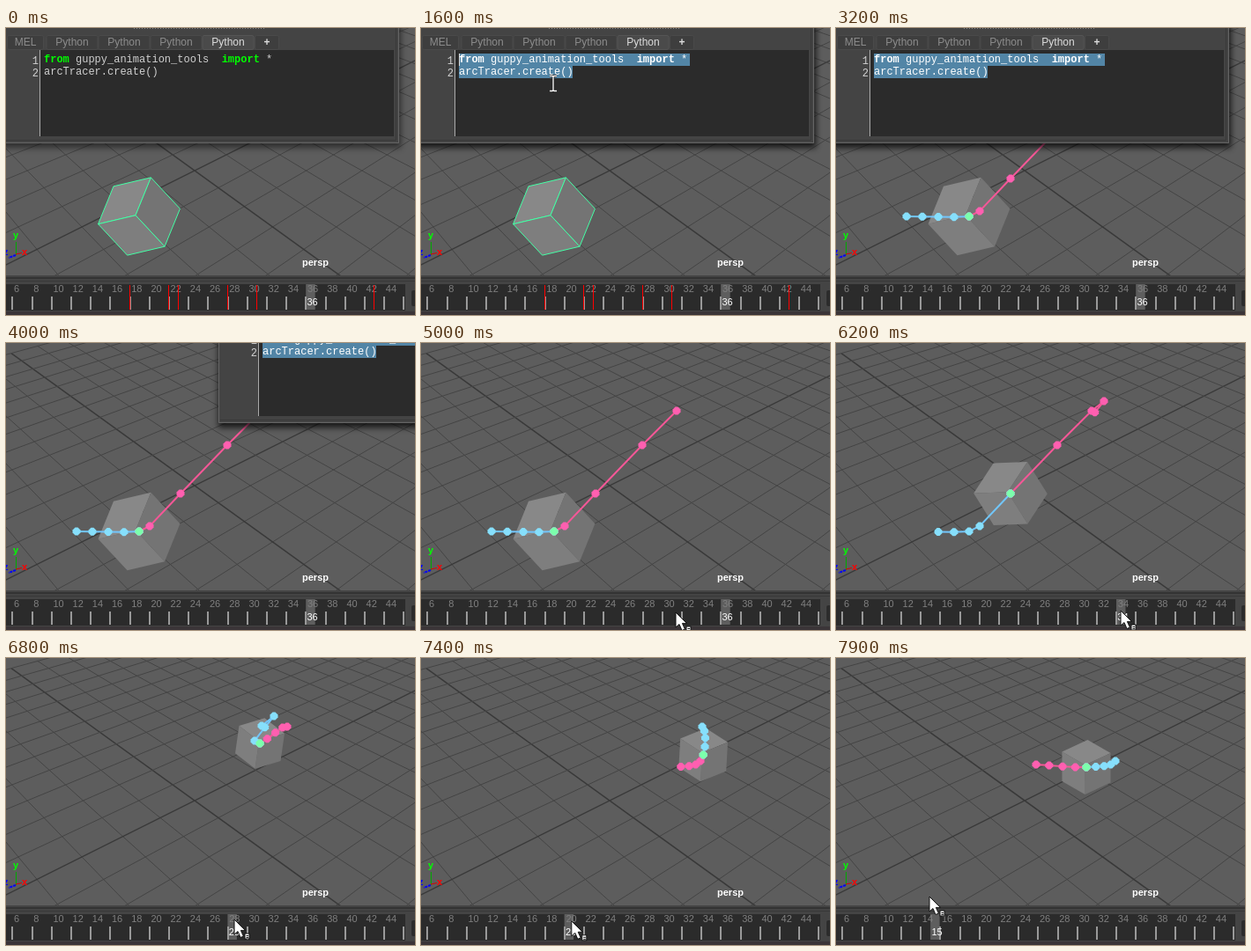
Write an HTML page that moves like this. It is 464 by 326 pixels and loops after 8000 ms.

```html
<!DOCTYPE html>
<html lang="en">
<head>
<meta charset="utf-8">
<title>Arc tracer</title>
<style>
html, body { margin: 0; width: 464px; height: 326px; overflow: hidden; background: #5d5d5d; }
svg { display: block; font: 11px "Liberation Sans", Arial, sans-serif; }
text { white-space: pre; }
.grid { stroke: #444; stroke-width: 1; fill: none; }
.axis { stroke: #393939; stroke-width: 1.5; fill: none; }
.bold { font-weight: bold; }
.mid { text-anchor: middle; }
.code { font: 12px "Liberation Mono", "DejaVu Sans Mono", monospace; fill: #d0d0d0; }
.kw { font-weight: bold; fill: #0f0; }
.selected .code, .selected .kw { fill: #fff; }
.tab { font-size: 12px; fill: #8c8c8c; }
.tab.active { fill: #ddd; }
.num { font-size: 11px; fill: #808080; }
</style>
</head>
<body>
<svg id="stage" width="464" height="326" viewBox="0 0 464 326">
  <defs>
    <filter id="soft" x="-10%" y="-20%" width="120%" height="150%"><feGaussianBlur stdDeviation="3.5"/></filter>
    <path id="beamShape" d="M-4-8.5H-1Q0-8.5 0-7Q0-8.5 1-8.5H4M0-7V7M-4 8.5H-1Q0 8.5 0 7Q0 8.5 1 8.5H4"/>
  </defs>

  <g id="grid"></g>
  <g id="cube" stroke-linejoin="round"></g>
  <g id="trail"></g>

  <g class="bold">
    <path d="M11.5 258V243" stroke="#0a0"/>
    <path d="M11 257L18 255.5" stroke="#d00"/>
    <path d="M11 258L3 261" stroke="#00f" stroke-width="2" stroke-dasharray="3 1"/>
    <text x="8" y="239" fill="#0f0">y</text>
    <text x="18" y="258" fill="#f00">x</text>
    <text x="-3" y="258" fill="#00f">z</text>
    <text class="mid" x="351" y="270" fill="#fff">persp</text>
  </g>

  <g id="slider">
    <rect y="281" width="464" height="45" fill="#444"/>
    <rect y="283" width="464" height="2" fill="#333"/>
    <rect y="287" width="464" height="1" fill="#383838"/>
    <rect y="291" width="453" height="30" fill="#2b2b2b"/>
    <rect x="460" y="298" width="6" height="18" rx="2" fill="#2b2b2b"/>
    <rect y="322" width="464" height="4" fill="#3b3538"/>
    <rect id="now" y="291" width="10.5" height="29" fill="#5e5e5e"/>
    <g id="ticks"></g>
    <g id="keys"></g>
    <text id="nowText" y="315" fill="#fff"></text>
  </g>

  <g id="editor">
    <rect id="shadow" x="-7" y="-30" width="455" height="166" fill="#000" filter="url(#soft)"/>
    <rect x="-7" y="-60" width="453" height="191" fill="#444"/>
    <path d="M-6.5-60V130.5H445.5V-60" stroke="#666" fill="none"/>
    <path d="M-5 127.5H442.5V-60" stroke="#383838" fill="none"/>
    <path d="M145 .5H295" stroke="#888" stroke-dasharray="1 2"/>
    <g id="tabs"></g>
    <rect x="39" y="25" width="401" height="98" fill="#2b2b2b"/>
    <path d="M38.5 25V123" stroke="#aaa"/>
    <g class="code" text-anchor="end"><text x="37" y="41">1</text><text x="37" y="55">2</text></g>
    <rect id="sel1" y="29" height="14" fill="#5285a6"/>
    <rect id="sel2" y="43" height="14" fill="#5285a6"/>
    <g id="script">
      <text class="code" x="43" y="39"><tspan class="kw">from</tspan> guppy_animation_tools  <tspan class="kw">import</tspan> *</text>
      <text class="code" x="43" y="53">arcTracer.create()</text>
    </g>
    <path id="caret" d="M43.5 29V43" stroke="#ddd"/>
  </g>

  <g id="beam" fill="none">
    <use href="#beamShape" stroke="#222" stroke-width="3"/>
    <use href="#beamShape" stroke="#fff" stroke-width="1.3"/>
  </g>
  <g id="arrow">
    <path d="M0 0V17L4 13.5L7 20.5L10.4 19L7.4 12.4H12.5Z" fill="#fff" stroke="#111"/>
    <rect x="12" y="16" width="5" height="6" fill="#fff" stroke="#111"/>
    <path d="M13.5 18.5H16M13.5 20.5H16" stroke="#111"/>
  </g>
</svg>
<script>
const LOOP = 8000, STEP = 100;
const $ = id => document.getElementById(id);
const lerp = (a, b, k) => a + (b - a) * k;
const show = (id, on) => $(id).setAttribute('visibility', on ? 'visible' : 'hidden');

function add(parent, tag, attrs, text) {
  const el = document.createElementNS('http://www.w3.org/2000/svg', tag);
  for (const name in attrs) el.setAttribute(name, attrs[name]);
  if (text !== undefined) el.textContent = text;
  return parent.appendChild(el);
}

// Index of the span of rows [key, ...values] that holds k.
const span = (rows, k) => {
  let i = 0;
  while (i < rows.length - 2 && rows[i + 1][0] <= k) i++;
  return i;
};

// Straight moves between key rows, held at both ends.
function sample(rows, k) {
  const i = span(rows, k), a = rows[i], b = rows[i + 1];
  const p = Math.min(1, Math.max(0, (k - a[0]) / (b[0] - a[0])));
  return a.slice(1).map((v, n) => lerp(v, b[n + 1], p));
}

// Smooth curve through the same kind of rows.
function spline(rows, k) {
  const i = span(rows, k), a = rows[i], b = rows[i + 1], d = b[0] - a[0], p = (k - a[0]) / d;
  const before = rows[Math.max(0, i - 1)], after = rows[Math.min(rows.length - 1, i + 2)];
  return [1, 2].map(n => {
    const m0 = (b[n] - before[n]) / (b[0] - before[0]) * d;
    const m1 = (after[n] - a[n]) / (after[0] - a[0]) * d;
    const ease = p * p * (3 - 2 * p);
    return lerp(a[n], b[n], ease) + p * (1 - p) * (m0 * (1 - p) - m1 * p);
  });
}

// Ground plane seen in perspective, given by its origin and two vanishing points.
const ORIGIN = [214, 162], VAN_U = [-417, -294], VAN_V = [1126, -294], CELL = 0.041;
function ground(u, v) {
  const a = u * CELL, b = v * CELL, w = 1 + a + b;
  return [0, 1].map(i => (ORIGIN[i] + a * VAN_U[i] + b * VAN_V[i]) / w);
}
function gridLine(from, to, axis) {
  add($('grid'), 'path', { class: axis ? 'axis' : 'grid', d: 'M' + ground(...from) + 'L' + ground(...to) });
}
for (let n = -12; n <= 12; n++) {
  const near = Math.max(-12, -20 - n);
  gridLine([12, n], [near, n], n === 0);
  gridLine([n, 12], [n, near], n === 0);
}

// Path of the cube: [time unit, x, y]
const PATH = [
  [11, 227, 121], [15, 284, 124], [19, 317, 117], [24, 319, 78], [28, 288, 97], [29, 282, 94],
  [31, 304, 66], [32, 290, 77], [33, 251, 116], [34, 198, 171], [35, 163, 208], [36, 151, 214], [40, 80, 214]
];
const at = f => spline(PATH, f);

// The cube keeps its yaw and pitch; size and roll follow [time unit, size, degrees].
const TURN = [[15, 39, 0], [28, 37, 8], [31, 37, 0], [34, 50, -32], [36, 56.5, -43]];
const RAD = Math.PI / 180, YAW = 48 * RAD, PITCH = 31 * RAD;
const EDGES = [
  [Math.cos(YAW), Math.sin(YAW) * Math.sin(PITCH)],
  [0, Math.cos(PITCH)],
  [-Math.sin(YAW), Math.cos(YAW) * Math.sin(PITCH)]
];
// Each corner is half of every edge, with these signs.
const FACES = [
  ['#888', [[-1, -1, 1], [-1, -1, -1], [1, -1, -1], [1, -1, 1]]],
  ['#747474', [[1, -1, -1], [1, 1, -1], [1, 1, 1], [1, -1, 1]]],
  ['#7e7e7e', [[1, 1, 1], [-1, 1, 1], [-1, -1, 1], [1, -1, 1]]]
].map(([fill, corners]) => ({ corners, el: add($('cube'), 'polygon', { fill }) }));

function drawCube(frame, picked) {
  const [size, roll] = sample(TURN, frame), [x, y] = at(frame);
  const c = Math.cos(roll * RAD), s = Math.sin(roll * RAD);
  const project = signs => {
    const [px, py] = [0, 1].map(n => signs.reduce((sum, sign, e) => sum + sign * EDGES[e][n], 0) * size / 2);
    return [x + px * c - py * s, y + px * s + py * c];
  };
  for (const { corners, el } of FACES) {
    el.setAttribute('points', corners.map(project).join(' '));
    el.setAttribute('stroke', picked ? '#43ffa5' : 'none');
  }
}

const REACH = 4;
function drawTrail(frame) {
  const g = $('trail');
  const dot = ([x, y], fill) =>
    add(g, 'path', { d: `M${x - 1.5} ${y - 4.5}h3l3 3v3l-3 3h-3l-3-3v-3z`, fill });
  const side = (from, color, line) => {
    const pts = Array.from({ length: REACH + 1 }, (_, n) => at(from + n));
    add(g, 'polyline', { points: pts.join(' '), fill: 'none', stroke: line, 'stroke-width': 2 });
    pts.forEach(p => dot(p, color));
  };
  side(frame - REACH, '#ff5fb0', '#f55797');
  side(frame, '#86dffc', '#72c6fb');
  dot(at(frame), '#7cffac');
}

// Time slider
const UNIT = 11.1, tickX = f => 7 + (f - 6) * UNIT;
for (let f = 6; f <= 46; f += 2) {
  add($('ticks'), 'rect', { x: Math.ceil(tickX(f) - 1), y: 305, width: 2, height: 15, fill: '#999' });
  if (f < 46) add($('ticks'), 'text', { class: 'num', x: tickX(f) + 2, y: 300 }, f);
}
for (const f of [18, 22, 23, 28, 31, 43])
  add($('keys'), 'rect', { x: Math.floor(tickX(f)), y: 292, width: 1, height: 28, fill: '#f00' });

function drawSlider(frame) {
  $('now').setAttribute('x', tickX(frame) + 0.2);
  $('nowText').setAttribute('x', tickX(frame) + 1.5);
  $('nowText').textContent = frame;
}

// Editor tabs
function addTab(label, x, w, active) {
  add($('tabs'), 'rect', {
    x: x - w / 2 + 0.5, y: 8.5, width: w - 1, height: 16, rx: 2,
    fill: active ? '#4a4a4a' : '#3e3e3e', stroke: active ? '#555' : '#4a4a4a'
  });
  add($('tabs'), 'text', { class: 'mid tab' + (active ? ' active' : ''), x, y: 20 }, label);
}
addTab('MEL', 22, 42);
for (let n = 0; n < 4; n++) addTab('Python', 75 + 59 * n, 59, n === 3);
addTab('+', 296, 28);
$('tabs').lastChild.classList.add('active', 'bold');

// Pointer moves: [ms, x, y]
const BEAM = [
  [100, 227, 8], [300, 146, 92], [700, 146, 92], [1100, 8, 9], [1200, 8, 9],
  [1600, 150, 63], [2300, 150, 63], [2700, 148, -14], [2800, 303, -14], [3000, 303, -4]
];
const ARROW = [
  [4500, 252, 184], [5000, 289, 306], [5300, 350, 308], [5500, 344, 306],
  [5700, 344, 306], [6200, 323, 304], [6800, 259, 297], [7800, 112, 300], [7900, 106, 271]
];

function drawEditor(t, [beamX]) {
  show('editor', t < 4100);
  const drag = Math.max(0, Math.min(1, (t - 3800) / 200));
  $('editor').setAttribute('transform', `translate(${248 * drag} ${-40 * drag})`);
  $('shadow').setAttribute('opacity', t < 700 ? 0.5 : 0.75);

  // Dragging backwards from the end of the script
  const all = t >= 1000, from = t < 800 ? 172 : all ? 43 : Math.max(43, beamX);
  const select = (id, start, end) => {
    $(id).setAttribute('x', start);
    $(id).setAttribute('width', Math.max(0, end - start));
  };
  select('sel1', 43, all ? 305 : 43);
  select('sel2', from, 172);
  $('script').setAttribute('class', all ? 'selected' : '');
  show('caret', t >= 1100 && t < 3800 && Math.floor((t - 1100) / 500) % 2 === 1);
}

function place(id, [x, y], on) {
  show(id, on);
  $(id).setAttribute('transform', `translate(${x} ${y})`);
}

function draw(t) {
  const beam = sample(BEAM, t), arrow = sample(ARROW, t);
  const frame = t < 5700 ? 36 : t >= 7800 ? 15 : Math.floor((arrow[0] - 7) / UNIT + 6);
  const traced = t >= 2100;
  drawCube(frame, !traced);
  $('trail').replaceChildren();
  if (traced) drawTrail(frame);
  show('keys', !traced);
  drawSlider(frame);
  drawEditor(t, beam);
  place('beam', beam, t >= 100 && t < 3200);
  place('arrow', arrow, t >= 4500);
}

const start = performance.now();
let shown = -1;
function tick() {
  const t = Math.floor(((performance.now() - start) % LOOP) / STEP) * STEP;
  if (t !== shown) draw(shown = t);
  requestAnimationFrame(tick);
}
tick();
</script>
</body>
</html>
```
